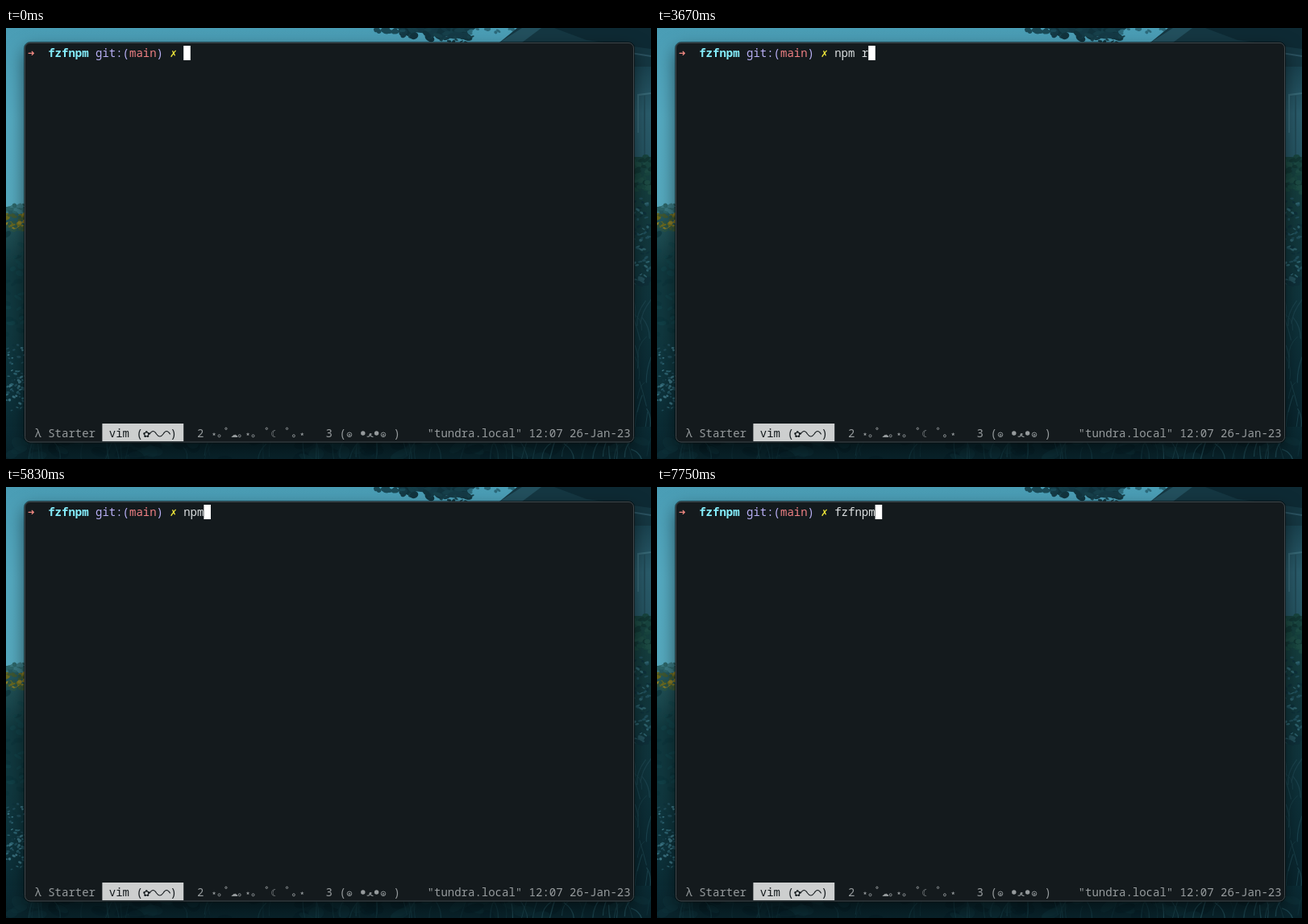
An HTML page with a canvas that plays this animation: 800x535 px, repeating every 8000 ms.

```html
<!DOCTYPE html>
<html lang="en">
<head>
<meta charset="utf-8">
<title>Terminal</title>
<style>
  html, body { margin: 0; width: 100%; height: 100%; overflow: hidden; background: #0a2931; }
  canvas, svg { position: absolute; left: 0; top: 0; }
  text { font: 14px "Noto Sans Mono", "DejaVu Sans Mono", monospace; white-space: pre; }
  .sym { font-family: "DejaVu Sans", "Noto Sans CJK JP", sans-serif; text-anchor: middle; }
  .window { filter: drop-shadow(0 9px 11px rgba(0, 0, 0, .55)); }
</style>
</head>
<body>
<canvas id="wall" width="800" height="535"></canvas>
<svg id="term" width="800" height="535" viewBox="0 0 800 535">
  <rect class="window" x="23" y="18" width="756" height="496.5" rx="7" fill="#141a1d"/>
  <rect x="22.5" y="17.5" width="757" height="497.5" rx="7.5" fill="none" stroke="#000" stroke-opacity=".5"/>
  <rect x="23.5" y="18.5" width="755" height="495.5" rx="6.5" fill="none" stroke="#3f484c"/>
  <rect x="119.4" y="491" width="100.8" height="22" fill="#cdcfcf"/>
</svg>
<script>
const CELL = 8.4, LEFT = 27, LOOP = 8000;
const TOP_LINE = 36, STATUS = 507.5, GREY = '#969b9d', DARK = '#141a1d';
const term = document.getElementById('term');
const colX = col => LEFT + col * CELL;

function add(tag, attrs, content = '') {
  const node = document.createElementNS('http://www.w3.org/2000/svg', tag);
  for (const key in attrs) node.setAttribute(key, attrs[key]);
  node.textContent = content;
  return term.appendChild(node);
}
const put = (col, y, str, fill, weight = 400) =>
  add('text', { x: colX(col), y, fill, style: `font-weight:${weight}` }, str);
const symbol = (col, str, size, fill = GREY, y = STATUS) =>
  add('text', { x: colX(col + .5), y, fill, class: 'sym', style: `font-size:${size}px` }, str);
const ring = (col, dx, y, r) =>
  add('circle', { cx: colX(col) + dx, cy: y, r, fill: 'none', stroke: GREY, 'stroke-width': .9 });
const line = (d, stroke = GREY) =>
  add('path', { d, fill: 'none', stroke, 'stroke-width': 1.1, 'stroke-linecap': 'round' });

// Wallpaper: soft painted garden around the window
const g = document.getElementById('wall').getContext('2d');
let seed = 7;
const rnd = (a, b) => {
  seed = (seed * 16807) % 2147483647;
  return a + (b - a) * seed / 2147483647;
};
function fade(x, y, w, h, ...colors) {
  const grad = g.createLinearGradient(0, y, 0, y + h);
  colors.forEach((c, i) => grad.addColorStop(i / (colors.length - 1), c));
  g.fillStyle = grad;
  g.fillRect(x, y, w, h);
}
function poly(color, ...p) {
  g.fillStyle = color;
  g.beginPath();
  for (let i = 0; i < p.length; i += 2) g.lineTo(p[i], p[i + 1]);
  g.fill();
}
function dabs(n, x, y, w, h, size, ...colors) {
  for (let i = 0; i < n; i++) {
    g.fillStyle = colors[i % colors.length];
    g.beginPath();
    g.ellipse(x + rnd(0, w), y + rnd(0, h), rnd(.5, 1) * size, rnd(.25, .6) * size, rnd(-.7, .7), 0, 7);
    g.fill();
  }
}
function blades(n, x, y, w, h, color) {
  g.strokeStyle = color;
  for (let i = 0; i < n; i++) {
    const bx = x + rnd(0, w), by = y + rnd(0, h);
    g.lineWidth = rnd(.5, 1.5);
    g.beginPath();
    g.moveTo(bx, by);
    g.quadraticCurveTo(bx + rnd(-4, 4), by - 15, bx + rnd(-14, 14), by - rnd(20, 36));
    g.stroke();
  }
}
function paintWall() {
  fade(0, 0, 800, 226, '#4a9db5', '#55aac1', '#56a9be');
  // left bank
  fade(0, 222, 60, 313, '#285c62', '#10393f', '#10383f', '#0d323b', '#08242c');
  dabs(26, 0, 219, 26, 10, 5, '#3b7a83', '#2d6669');
  dabs(40, 0, 231, 24, 20, 4, '#6a6a20', '#8a7d27', '#3f5832', '#2a5448');
  dabs(30, 0, 256, 24, 125, 6, '#12444b99', '#0c333a99');
  dabs(75, 0, 393, 24, 82, 2.8, '#2b6270', '#1f4d5a', '#0e343d', '#3a7280');
  // overhanging branches
  poly('#153c48', 483, 0, 583, 0, 572, 7, 556, 12, 535, 9, 515, 6, 495, 4);
  dabs(55, 490, 1, 85, 12, 7, '#17404b', '#153a46', '#12343e');
  dabs(14, 458, 0, 40, 5, 5, '#1b4b58');
  dabs(14, 530, 10, 50, 8, 3, '#17404b');
  dabs(12, 575, 0, 55, 6, 4, '#2c6a7b');
  // roof and wall
  poly('#153742', 634, 0, 800, 0, 800, 60, 779, 54, 660, 18, 612, 18);
  poly('#23505e', 640, 0, 664, 0, 640, 18, 612, 18);
  poly('#0e2a34', 680, 0, 800, 0, 800, 26, 720, 15);
  poly('#2b5361', 775, 30, 800, 34, 800, 36, 775, 32);
  fade(776, 48, 24, 116, '#1a4350', '#2a5c6b', '#265563');
  poly('#386977', 783, 82, 800, 80, 800, 82, 785, 84, 785, 130, 783, 130);
  poly('#214b58', 791, 84, 793, 84, 793, 160, 791, 160);
  // right bank
  fade(774, 160, 26, 375, '#17423f', '#12383d', '#0f343c', '#0b2a33', '#08222a');
  dabs(40, 776, 160, 24, 45, 6, '#18453f', '#123734', '#1d4b44');
  dabs(60, 776, 208, 24, 102, 3, '#1f4e5a', '#2d616c', '#0e313b');
  dabs(8, 780, 311, 20, 6, 7, '#23505b', '#0f303a');
  blades(16, 776, 355, 24, 160, '#1a424c');
  // foreground
  fade(0, 495, 800, 40, '#0b2c35', '#09242c');
  dabs(70, 0, 508, 800, 27, 14, '#0d303999', '#07202899');
  blades(45, 0, 530, 800, 14, '#12363f');
  blades(16, 610, 532, 190, 12, '#1c454f');
}

function drawStatus() {
  put(1, STATUS, 'λ Starter', GREY);
  put(12, STATUS, 'vim (', DARK);
  symbol(17, '✿', 11, DARK);
  line(`M${colX(18)} 504 q4.2 -7 8.4 0 q4.2 6 8.4 0 q4.2 -7 8.4 0`, DARK);
  put(21, STATUS, ')', DARK);
  put(25, STATUS, '2', GREY);
  for (const col of [27, 32, 40]) symbol(col, '⋆', 12);
  for (const col of [28, 31, 33, 39]) ring(col, 2.3, 506.3, 1.5);
  for (const col of [29, 35, 38]) ring(col, 2.3, 497.3, 1.2);
  symbol(30, '☁', 9);
  symbol(36, '☾', 12);
  put(44, STATUS, '3 (', GREY);
  for (const col of [47, 52]) {
    ring(col, 4.2, 504.8, 2.8);
    ring(col, 4.2, 505.3, 1);
  }
  for (const col of [49, 51])
    add('circle', { cx: colX(col + .5), cy: 503, r: 2.7, fill: GREY });
  line(`M${colX(50) + 1} 507 q3 1 3 -2 q0 -2 2 -1 q-3 2 2 3.5`);
  put(54, STATUS, ')', GREY);
  put(59, STATUS, '"tundra.local" 12:07 26-Jan-23', GREY);
}

paintWall();
drawStatus();
put(0, TOP_LINE, '➜', '#f28a83');
put(3, TOP_LINE, 'fzfnpm', '#85edfb', 600);
put(10, TOP_LINE, 'git:(', '#b9b0f6', 500);
put(15, TOP_LINE, 'main', '#ef8084', 500);
put(19, TOP_LINE, ')', '#b9b0f6', 500);
put(21, TOP_LINE, '✗', '#f0e63a');
const typed = put(23, TOP_LINE, '', '#dce0e1');
const cursor = add('rect', { y: 22, width: 8.6, height: 18, fill: '#fff' });

// Each entry: start time, then the command line from that moment
const keys = [
  [0, ''], [3000, 'n'], [3080, 'npm'], [3330, 'npm '], [3670, 'npm r'],
  [3750, 'npm run'], [3830, 'npm run '], [4250, 'npm run ?'], [4420, 'npm run ??'],
  [4580, 'npm run ???'], [5420, 'npm run ??'], [5670, 'npm run ?'], [5750, 'npm ru'],
  [5830, 'npm'], [5920, ''], [6830, 'f'], [6920, 'fz'], [7000, 'fzf'],
  [7420, 'fzfn'], [7580, 'fzfnp'], [7750, 'fzfnpm']
];
const blinks = [[1170, 1670], [2250, 2750], [5250, 5420]];

function frame(now) {
  const t = now % LOOP;
  const command = keys.findLast(([start]) => start <= t)[1];
  const hidden = blinks.some(([off, on]) => t >= off && t < on);
  typed.textContent = command;
  cursor.setAttribute('x', colX(23 + command.length));
  cursor.setAttribute('visibility', hidden ? 'hidden' : 'visible');
  requestAnimationFrame(frame);
}
frame(0);
</script>
</body>
</html>
```
